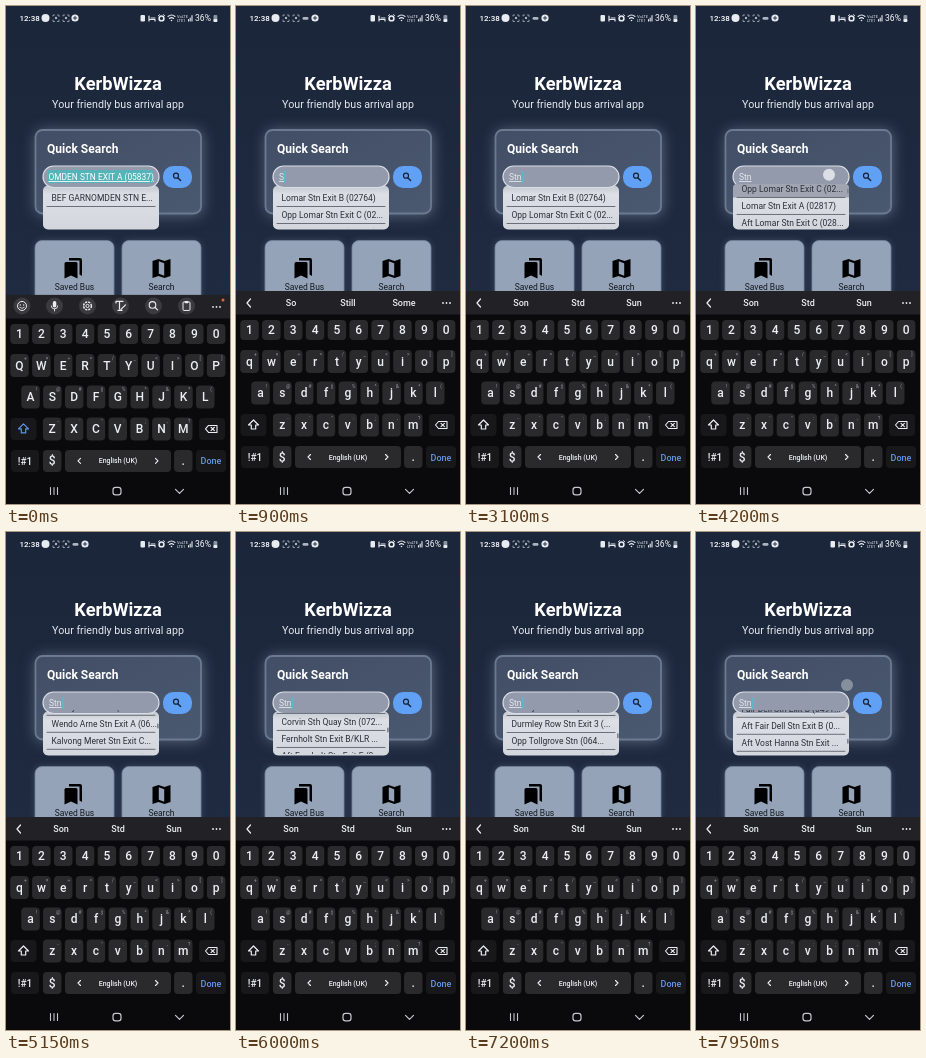
Animation, 224 px wide and 498 px high, one loop 8000 ms. Source, as an HTML page:

```html
<!DOCTYPE html>
<html lang="en">
<head>
<meta charset="utf-8">
<title>Bus arrival search</title>
<style>
  html, body { margin: 0; width: 100%; height: 100%; overflow: hidden; background: #1e293b; }
  svg { display: block; width: 224px; height: 498px; font-family: Roboto, sans-serif; }
  .line { fill: none; stroke-linecap: round; stroke-linejoin: round; }
  #card { filter: drop-shadow(1px 1px 7px rgba(148, 163, 184, .5)); }
  .tile { filter: drop-shadow(0 0 3px rgba(148, 163, 184, .25)); }
</style>
</head>
<body>
<svg id="stage" viewBox="0 0 224 498"></svg>
<script>
const LOOP = 8000, ROW = 17, TYPED = [400, 1050, 1690];
const stage = document.getElementById('stage');
const $ = id => document.getElementById(id);
const clamp = v => Math.max(0, Math.min(1, v));
const easeOut = p => 1 - (1 - clamp(p)) ** 3;

const rect = (x, y, w, h, r, fill, more = '') =>
  `<rect x="${x}" y="${y}" width="${w}" height="${h}" rx="${r}" fill="${fill}" ${more}/>`;
const circle = (x, y, r, fill, more = '') => `<circle cx="${x}" cy="${y}" r="${r}" fill="${fill}" ${more}/>`;
const ring = (x, y, r, color, width = 1, more = '') =>
  circle(x, y, r, 'none', `stroke="${color}" stroke-width="${width}" ${more}`);
const text = (x, y, size, fill, str, more = '') =>
  `<text x="${x}" y="${y}" font-size="${size}" fill="${fill}" ${more}>${str}</text>`;
const line = (d, color, width = 1, more = '') =>
  `<path class="line" d="${d}" stroke="${color}" stroke-width="${width}" ${more}/>`;
const MID = 'text-anchor="middle" ', BOLD = 'font-weight="700" ', MEDIUM = 'font-weight="500" ';
const esc = c => c.replace('&', '&amp;').replace('<', '&lt;');

// Stops in the result list; gaps are filled from the neighbouring places.
const known = {
  0: 'Lomar Stn Exit B (02764)', 1: 'Opp Lomar Stn Exit C (02...',
  2: 'Lomar Stn Exit A (02817)', 3: 'Aft Lomar Stn Exit C (028...',
  11: 'Wendo Arne Stn Exit A (06...', 12: 'Kalvong Meret Stn Exit C...',
  15: 'Corvin Sth Quay Stn (072...', 16: 'Fernholt Stn Exit B/KLR ...',
  17: 'Aft Fernholt Stn Exit E (0...', 21: 'Durmley Row Stn Exit 3 (...',
  22: 'Opp Tollgrove Stn (064...', 26: 'Fair Dell Stn Exit B (0491...',
  27: 'Aft Fair Dell Stn Exit B (0...', 28: 'Aft Vost Hanna Stn Exit ...'
};
const places = ['Ostrey', 'Wendo Arne', 'Kalvong', 'Durmley', 'Tollgrove'];
const stops = Array.from({ length: 34 }, (_, i) =>
  known[i] || `${i % 2 ? 'Opp ' : ''}${places[i % 5]} Stn Exit ${'ABCD'[i % 4]} (0...`);
const listRow = (str, i) =>
  text(45.5, 195.2 + i * ROW, 8.5, '#2b2e36', str) + line(`M41 ${200.5 + i * ROW}H149`, '#50545c', .8);

function statusBar() {
  const w = '#e8ebf0', dim = '#aeb5c1';
  const scan = x => line(`M${x - 3} 10V9h1.5M${x + 1.5} 9h1.5v1.5M${x + 3} 14v1.5h-1.5M${x - 1.5} 15.5h-1.5v-1.5`, dim, .8) +
    circle(x, 12, 1.2, dim);
  return text(13.5, 15, 8, '#fff', '12:38', MEDIUM) + circle(39.5, 12, 4, w) + scan(50) + scan(60) +
    `<g id="cloud">${rect(66.5, 11, 6, 2.8, 1.4, dim)}</g>` +
    `<g id="plus">${circle(79, 12, 3.6, w)}${line('M77.3 12h3.4M79 10.3v3.4', '#1e293b', .9)}</g>` +
    rect(134.5, 9, 4.5, 6.5, 1, w) + line('M143 10v5M143 13.5h6v1.5M145 12h4', w, 1.2) +
    ring(155.5, 12.4, 2.4, w, 1.6) + line('M152.5 9.5l1-.8M158.5 9.5l-1-.8', w) +
    line('M162 10.5q3.5-3 7 0M163.4 12.5q2.1-1.7 4.2 0', w, 1.1) + circle(165.5, 14.5, .8, w) +
    text(171, 12, 4, w, 'VoLTE') + text(171, 15.8, 4, w, 'LTE1') +
    line('M182.5 15v-1.5M184.2 15v-3M186 15v-5.5', w, 1.1) +
    text(189, 15, 8.6, '#fff', '36%') + rect(207.5, 9, 3.8, 7, 1, '#8b94a3') + rect(207.5, 13, 3.8, 3, 1, w);
}

function page() {
  const tile = (x, label, icon) =>
    `<g class="tile">${rect(x, 234.5, 79, 70, 7, '#94a3b8', 'stroke="#74839a" stroke-width=".8"')}</g>${icon}` +
    text(x + 39.5, 284, 8.5, '#15191f', label, MID);
  const bookmarks = '<path d="M60 256h10q1.5 0 1.5 1.5v15l-6.5-3-6.5 3v-15q0-1.5 1.5-1.5zM63 252h11q2 0 2 2v16l-2.5-1.5v-14h-10.5z"/>';
  const map = '<path d="M146.5 255l6-2 6 2 6-2v17l-6 2-6-2-6 2z"/><path d="M152.8 255.3l5.4 1.9v12.500l-5.4-1.9z" fill="#94a3b8"/>';
  return text(112, 84, 18.3, '#fff', 'KerbWizza', MID + BOLD) +
    text(112, 102, 10.7, '#e5e8ee', 'Your friendly bus arrival app', MID) +
    `<g id="card">${rect(29.5, 124, 165.5, 83.5, 7, 'url(#panel)', 'stroke="#6b7a91" stroke-width="1.8"')}</g>` +
    text(41, 147, 12, '#fff', 'Quick Search', BOLD) +
    rect(157, 160, 29, 22, 10, '#60a0f5') + ring(170, 169.7, 2.5, '#172033', 1.2) + line('M172 172l2.6 2.6', '#172033', 1.4) +
    tile(29, 'Saved Bus', bookmarks) + tile(116, 'Search', map) +
    rect(37, 179.5, 116, 44, 5, 'url(#popup)') +
    rect(37, 160, 116, 21.5, 10.7, '#929aab', 'stroke="#d9dde5" stroke-width="1.2"') +
    `<g clip-path="url(#field)"><g id="chosen">${rect(42, 164, 106, 13, 0, '#55b4b8')}` +
    text(42.5, 174, 8.4, '#fff', 'OMDEN STN EXIT A (05837)', 'text-decoration="underline"') + '</g>' +
    text(43, 174, 8.5, '#e6e9ee', '', 'id="query" text-decoration="underline"') +
    rect(56.5, 165, 1.3, 12, 0, '#24d3d5', 'id="caret"') + '</g>' +
    `<g clip-path="url(#listBox)"><g id="single">${listRow('BEF GARNOMDEN STN E...', 0)}</g>` +
    `<g id="list">${rect(37, 0, 116, ROW, 0, '#a0a5b1', 'id="pressed"')}${stops.map(listRow).join('')}</g></g>` +
    rect(151, 0, 1.7, 5, .8, '#80858f', 'id="thumb"') +
    circle(0, 0, 6, '#f4f5f8', 'id="finger"');
}

const rows = [
  ['1234567890', '', 13.5, 324],
  ['qwertyuiop', '+×÷=/_<>[]', 13.5, 355.5],
  ['asdfghjkl', '!@#$%^&*(', 24.5, 387],
  ['zxcvbnm', '-\'":;,?', 46.2, 419]
];
const KEY = '#2a2a2d', DARK_KEY = '#18181b';
const keyBox = (x, y, w, h = 22, fill = KEY, more = '') => rect(x - w / 2, y - h / 2, w, h, 4, fill, more);

function keyboard() {
  const w = '#eceef1';
  const keys = rows.map(([chars, hints, x0, y]) => [...chars].map((c, i) => {
    const x = x0 + i * 21.85;
    return keyBox(x, y, 18.5, hints ? 23 : 20, KEY, `id="key-${c}"`) +
      text(x, y + 4.2, 12, w, c, MID + MEDIUM + (hints ? 'class="letter"' : '')) +
      (hints ? text(x + 5.8, y - 5.5, 5, '#94979d', esc(hints[i]), MID) : '');
  }).join('')).join('');
  const icons = [16, 48.5, 81.5, 114.5, 147.5, 180.5].map(x => circle(x, 296, 8.5, '#3b3a3f')).join('') +
    ring(16, 296, 4.5, w) + circle(14.3, 295, .7, w) + circle(17.7, 295, .7, w) + line('M13.8 297.5q2.2 2 4.4 0', w, .8) +
    rect(46.8, 291, 3.5, 6.5, 1.7, w) + line('M45.3 296q0 3 3.2 3t3.2-3M48.500 299v2', w, .9) +
    ring(81.5, 296, 3.9, w, 1.5, 'stroke-dasharray="2.1 1"') + ring(81.5, 296, 1.6, w) +
    line('M110 293v-1.5h7M113.5 292v7M115 299.5l4.5-4.5M112 300.5h4', w, 1.2) +
    ring(146.5, 295, 3.3, w, 1.1) + line('M149 297.5l2.5 2.5', w, 1.2) +
    rect(177, 292, 7, 8.5, 1, 'none', `stroke="${w}"`) + rect(178.8, 291, 3.5, 2.2, .6, w) +
    circle(217, 290, 1.5, '#e66336');
  return rect(0, 285, 224, 220, 0, '#0a090c') + rect(0, 285, 224, 23.5, 0, '#222226') +
    `<g id="tools">${icons}</g>` +
    `<g id="words">${line('M14.5 293l-3.5 4 3.5 4', w, 1.2)}` +
    [55, 112, 168].map((x, i) => text(x, 300, 9, w, '', `${MID + MEDIUM} id="word${i}"`)).join('') + '</g>' +
    [207, 210.5, 214].map(x => circle(x, 297, .9, w)).join('') + keys +
    keyBox(17.5, 419, 26, 22, DARK_KEY) + line('M17.5 414l-5 5h2.8v4h4.4v-4h2.8z', w, 1.2, 'id="shift"') +
    keyBox(206, 419, 26, 22, DARK_KEY) + line('M202.5 415.5h8.500v7h-8.500l-3-3.5zM205 417.3l3.4 3.4M208.4 417.3l-3.4 3.4', w, 1.1) +
    keyBox(19, 451, 28, 22, DARK_KEY) + text(19, 455, 10, w, '!#1', MID + MEDIUM) +
    keyBox(46.2, 451, 18.5) + text(46.2, 455.5, 12, w, '$', MID + MEDIUM) +
    keyBox(112, 451, 106) + text(112, 453.5, 7, w, 'English (UK)', MID + MEDIUM) +
    line('M74.5 448.5l-2.5 2.5 2.5 2.5M149.5 448.5l2.5 2.5-2.5 2.5', w, 1.1) +
    keyBox(177.3, 451, 18.5) + text(177.3, 455, 12, w, '.', MID + MEDIUM) +
    keyBox(205, 451, 30, 22, DARK_KEY) + text(205, 454.5, 9, '#6696e8', 'Done', MID + MEDIUM);
}

stage.innerHTML = `<defs>
  <linearGradient id="sky" x2="0" y2="1"><stop stop-color="#1b263a"/><stop offset="1" stop-color="#222e46"/></linearGradient>
  <linearGradient id="panel" x2="1" y2="1"><stop stop-color="#414e65"/><stop offset="1" stop-color="#4b5970"/></linearGradient>
  <linearGradient id="popup" x2="0" y2="1"><stop stop-color="#c3c7cf"/><stop offset=".2" stop-color="#dcdfe5"/><stop offset="1" stop-color="#d3d6dd"/></linearGradient>
  <clipPath id="field"><rect x="38" y="161" width="114" height="20" rx="10"/></clipPath>
  <clipPath id="listBox"><rect x="37" y="178" width="116" height="44" rx="4"/></clipPath>
</defs>` + rect(0, 0, 224, 498, 0, 'url(#sky)') + statusBar() + page() +
  `<g id="board">${keyboard()}</g>` +
  line('M44.5 481.5v7M48 481.5v7M51.5 481.5v7', '#c6c8cc', 1.1) +
  rect(107, 481.3, 8, 7.5, 2.6, 'none', 'stroke="#c6c8cc" stroke-width="1.2"') +
  line('M169.5 483.3l4 4 4-4', '#c6c8cc', 1.2);

const letters = [...document.querySelectorAll('.letter')];
const lower = letters.map(e => e.textContent);

// Each swipe: start time and distance the list travels.
const swipes = [[4080, 67], [4800, 146], [5650, 53.5], [6650, 93.3], [7670, 134]];
const scrollAt = t => swipes.reduce((sum, [at, d]) => sum + d * easeOut((t - at) / 800), 0);
const show = (id, visible) => $(id).setAttribute('opacity', +visible);

function draw(t) {
  const typed = TYPED.filter(at => t >= at).length;
  const caps = !typed, since = t - TYPED[Math.max(0, typed - 1)];

  $('board').setAttribute('transform', `translate(0 ${4 * (1 - easeOut(t / 200))})`);
  letters.forEach((e, i) => e.textContent = caps ? lower[i].toUpperCase() : lower[i]);
  $('shift').setAttribute('stroke', caps ? '#5d94ee' : '#eceef1');
  [...'stn'].forEach((c, i) =>
    $('key-' + c).setAttribute('fill', Math.abs(t - TYPED[i]) < 60 ? '#5b5d64' : KEY));

  show('chosen', caps);
  show('single', caps);
  show('list', !caps);
  show('tools', caps);
  show('words', !caps);
  show('cloud', !caps);
  $('plus').setAttribute('transform', `translate(${caps ? -10 : 0} 0)`);
  $('query').textContent = 'Stn'.slice(0, typed);
  $('caret').setAttribute('x', [42, 48.5, 51.5, 56.5][typed]);
  show('caret', !caps && Math.floor(since / 501.5) % 2 === 0);

  const drafts = ['So', 'Still', 'Some'];
  const words = [drafts, drafts, ['St', 'Still', 'Sta'], ['Son', 'Std', t < 1900 ? 'Sor' : 'Sun']][typed];
  words.forEach((word, i) => {
    $('word' + i).textContent = word;
    show('word' + i, clamp((since - i * 50) / 150));
  });

  const scroll = scrollAt(t);
  $('list').setAttribute('transform', `translate(0 ${-scroll})`);
  $('thumb').setAttribute('y', 181 + scroll / 760 * 43);
  show('thumb', scroll > 0);

  const i = swipes.findIndex(([at]) => t >= at && t < at + 330);
  const start = i < 0 ? t - 330 : swipes[i][0], age = t - start;
  $('finger').setAttribute('cx', 133 + i * 4.5);
  $('finger').setAttribute('cy', 186 - 33 * clamp(age / 230));
  show('finger', .75 * clamp((330 - age) / 100));
  $('pressed').setAttribute('y', 183.5 + ROW * Math.floor((scrollAt(start) + 20) / ROW));
  show('pressed', age < 230);
}

function tick() {
  draw(performance.now() % LOOP);
  requestAnimationFrame(tick);
}
tick();
</script>
</body>
</html>
```
